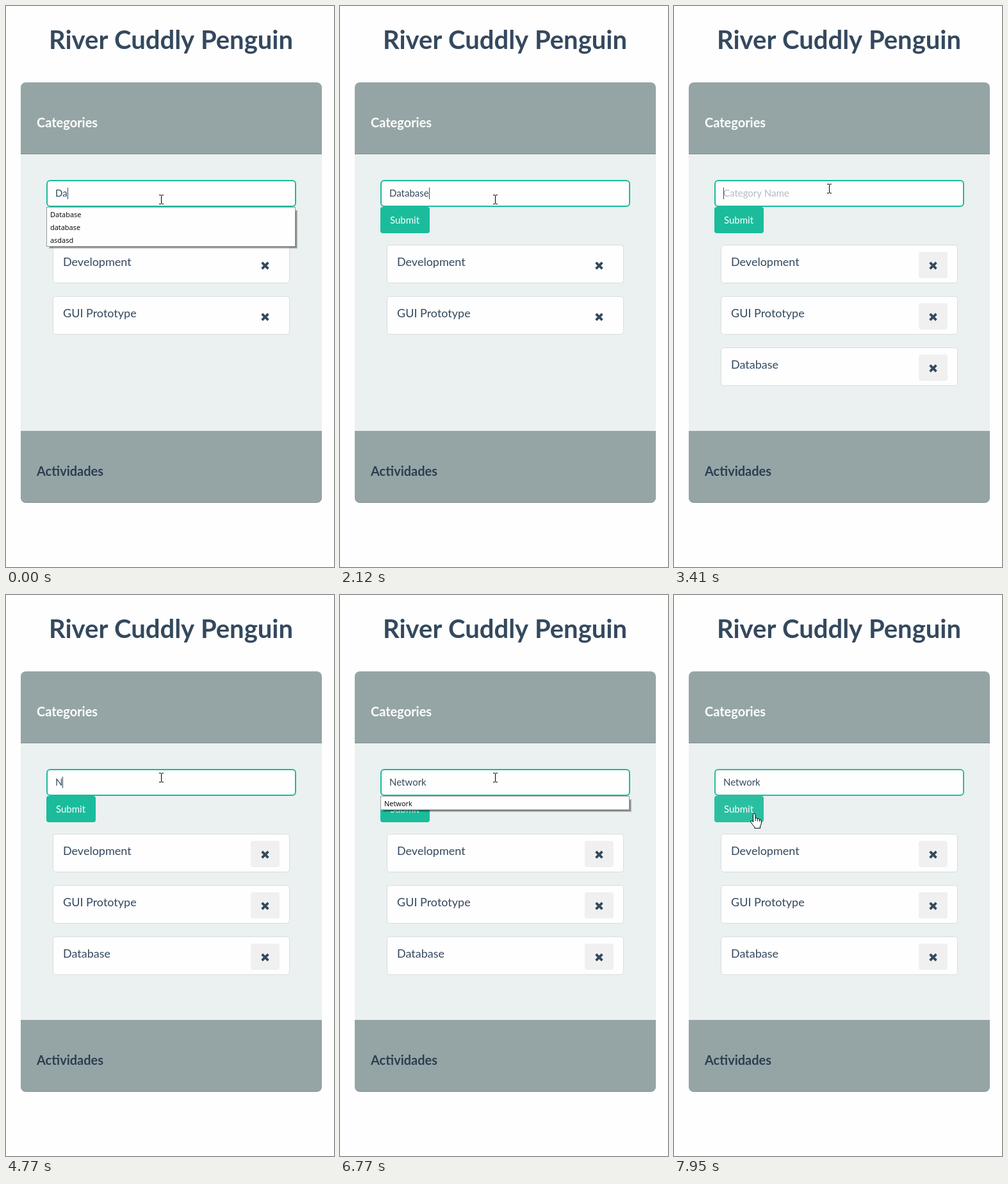
An HTML page with a canvas for the animation above (8000 ms loop, 512 by 874 pixels).

```html
<!DOCTYPE html>
<html lang="en">
<head>
<meta charset="utf-8">
<title>Categories</title>
<style>
html, body { margin: 0; width: 100%; height: 100%; overflow: hidden; background: #fefefe; }
canvas { display: block; }
</style>
</head>
<body>
<canvas id="stage" width="512" height="874"></canvas>
<script>
const ctx = document.getElementById('stage').getContext('2d');
const LOOP = 8000;
const INK = '#34495e', TEAL = '#1abc9c', WHITE = '#fefefe', SLATE = '#95a5a6';
const LATO = 'Lato, sans-serif';

const START = {
  text: 'Da', caret: true, list: ['Database', 'database', 'asdasd'],
  cards: ['Development', 'GUI Prototype'], chips: false,
  pointer: 'beam', x: 242, y: 301, button: TEAL, border: TEAL
};

const typed = (text, more) => ({ text, caret: true, ...more });
const blink = caret => ({ caret });
const move = (x, y, more) => ({ x, y, ...more });

// Each step changes part of the state from its time onward.
const STEPS = [
  [250, blink(false)],
  [400, typed('Dat')],
  [520, { list: ['Database', 'database'] }],
  [670, typed('Data')],
  [1200, blink(false)],
  [1600, typed('Datab')],
  [1750, typed('Databas')],
  [2000, typed('Database')],
  [2120, { list: [] }],
  [2270, typed('', { cards: ['Development', 'GUI Prototype', 'Database'], chips: true })],
  [2670, blink(false)],
  [3140, move(242, 282)],
  [3290, move(242, 283, blink(true))],
  [3410, move(242, 284)],
  [3810, blink(false)],
  [4240, blink(true)],
  [4770, typed('N')],
  [4920, { list: ['Network'] }],
  [5070, typed('Ne')],
  [5190, typed('Net')],
  [5720, typed('Netw')],
  [5840, typed('Netwo')],
  [5990, typed('Networ')],
  [6240, typed('Network')],
  [6770, blink(false)],
  [7050, move(241, 286)],
  [7200, move(240, 290)],
  [7320, move(236, 296, blink(true))],
  [7440, move(226, 304)],
  [7590, move(166, 322, { pointer: 'arrow' })],
  [7710, move(125, 340, { pointer: 'hand' })],
  [7830, { list: [], caret: false, button: '#22bd9f' }],
  [7950, { button: '#2bbfa2', border: '#2bbba0' }]
];

function stateAt(time) {
  const state = { ...START };
  for (const [at, change] of STEPS) if (at <= time) Object.assign(state, change);
  return state;
}

function rect(x, y, w, h, color) {
  ctx.fillStyle = color;
  ctx.fillRect(x, y, w, h);
}

function rounded(x, y, w, h, radius, fill, stroke, width = 1) {
  const inset = stroke ? width / 2 : 0;
  ctx.beginPath();
  ctx.roundRect(x + inset, y + inset, w - 2 * inset, h - 2 * inset, radius);
  ctx.fillStyle = fill;
  ctx.fill();
  if (!stroke) return;
  ctx.strokeStyle = stroke;
  ctx.lineWidth = width;
  ctx.stroke();
}

function label(text, x, y, font, color, align = 'left') {
  ctx.font = font;
  ctx.fillStyle = color;
  ctx.textAlign = align;
  ctx.fillText(text, x, y);
}

function drawPage() {
  rect(0, 0, 512, 874, WHITE);
  label('River Cuddly Penguin', 257.5, 67, `bold 40px ${LATO}`, INK, 'center');
  rounded(23, 119, 470, 112, [8, 8, 0, 0], SLATE);
  rect(23, 230, 470, 1, '#7f8c8d');
  rect(23, 231, 470, 431, '#ebf0f0');
  rounded(23, 662, 470, 112, [0, 0, 8, 8], '#7f8c8d');
  rounded(23, 662, 470, 111, [0, 0, 8, 8], SLATE);
  label('Categories', 48, 189, `bold 20px ${LATO}`, WHITE);
  label('Actividades', 48, 732, `bold 20px ${LATO}`, '#2c3e50');
}

function drawCard(name, y, chip) {
  rounded(73, y, 370, 60, 4, WHITE, '#d8dddd');
  label(name, 89, y + 33, `18px ${LATO}`, INK);
  if (chip) rounded(382, y + 11, 45, 41, 4, '#f0f0f0');
  const cx = 404.5, cy = y + 32.5, r = 4.9;
  ctx.beginPath();
  ctx.moveTo(cx - r, cy - r);
  ctx.lineTo(cx + r, cy + r);
  ctx.moveTo(cx + r, cy - r);
  ctx.lineTo(cx - r, cy + r);
  ctx.strokeStyle = INK;
  ctx.lineWidth = 3.8;
  ctx.stroke();
}

function drawForm({ text, caret, button, border }) {
  rounded(63, 313, 77, 41, 4, button);
  label('Submit', 78, 339, `15px ${LATO}`, WHITE);
  rounded(63, 271, 390, 42, 5, WHITE, border, 2);
  label(text || 'Category Name', 77, 297, `15px ${LATO}`, text ? INK : '#b2bcc5');
  if (caret) rect(Math.round(77 + (text ? ctx.measureText(text).width : 0)), 283, 1, 18, INK);
}

function drawList(items) {
  if (!items.length) return;
  const height = 2 + 20 * items.length;
  for (let i = 0; i < 3; i++) {
    rect(67 + i, 318 + i, 388 - 2 * i, height - 2 - 2 * i, 'rgba(0,0,0,.2)');
  }
  rect(63, 313, 389, height, '#9a9a9a');
  rect(64, 314, 387, height - 2, WHITE);
  items.forEach((item, i) => label(item, 69, 329 + 20 * i, '11px "Open Sans", sans-serif', '#000'));
}

const POINTERS = {
  hand: 'M-1.5 11V2.5Q-1.5 .5 .2 .5Q2 .5 2 2.5V7.5Q4.8 6.7 5.3 8.5Q8 7.8 8.4 9.8' +
    'Q11.3 9.5 11.3 12V15.5Q11.3 18 9.5 20V23.3H.8V21.3Q-2.5 18-5.2 13.8Q-5.8 12-4 11.7Q-2.7 11.7-1.5 13.5Z' +
    'M2 7.5V12M5.3 8.5V12.5M8.4 9.8V13',
  arrow: 'M.5 .5V16.5L4.2 13L6.7 18.5L9 17.5L6.6 12.2H11.5Z'
};

function drawPointer({ pointer, x, y }) {
  if (pointer === 'beam') {
    rect(x, y - 6, 1, 13, '#000');
    for (const dy of [-7, 7]) {
      rect(x - 3, y + dy, 3, 1, '#000');
      rect(x + 1, y + dy, 3, 1, '#000');
    }
    return;
  }
  const path = new Path2D(POINTERS[pointer]);
  ctx.save();
  ctx.translate(x, y);
  ctx.fillStyle = '#fff';
  ctx.strokeStyle = '#000';
  ctx.lineWidth = 1;
  ctx.fill(path);
  ctx.stroke(path);
  ctx.restore();
}

function draw(time) {
  const state = stateAt(time);
  drawPage();
  state.cards.forEach((name, i) => drawCard(name, 372 + 80 * i, state.chips));
  drawForm(state);
  drawList(state.list);
  drawPointer(state);
}

const begin = performance.now();
function tick() {
  draw((performance.now() - begin) % LOOP);
  requestAnimationFrame(tick);
}
tick();
</script>
</body>
</html>
```
